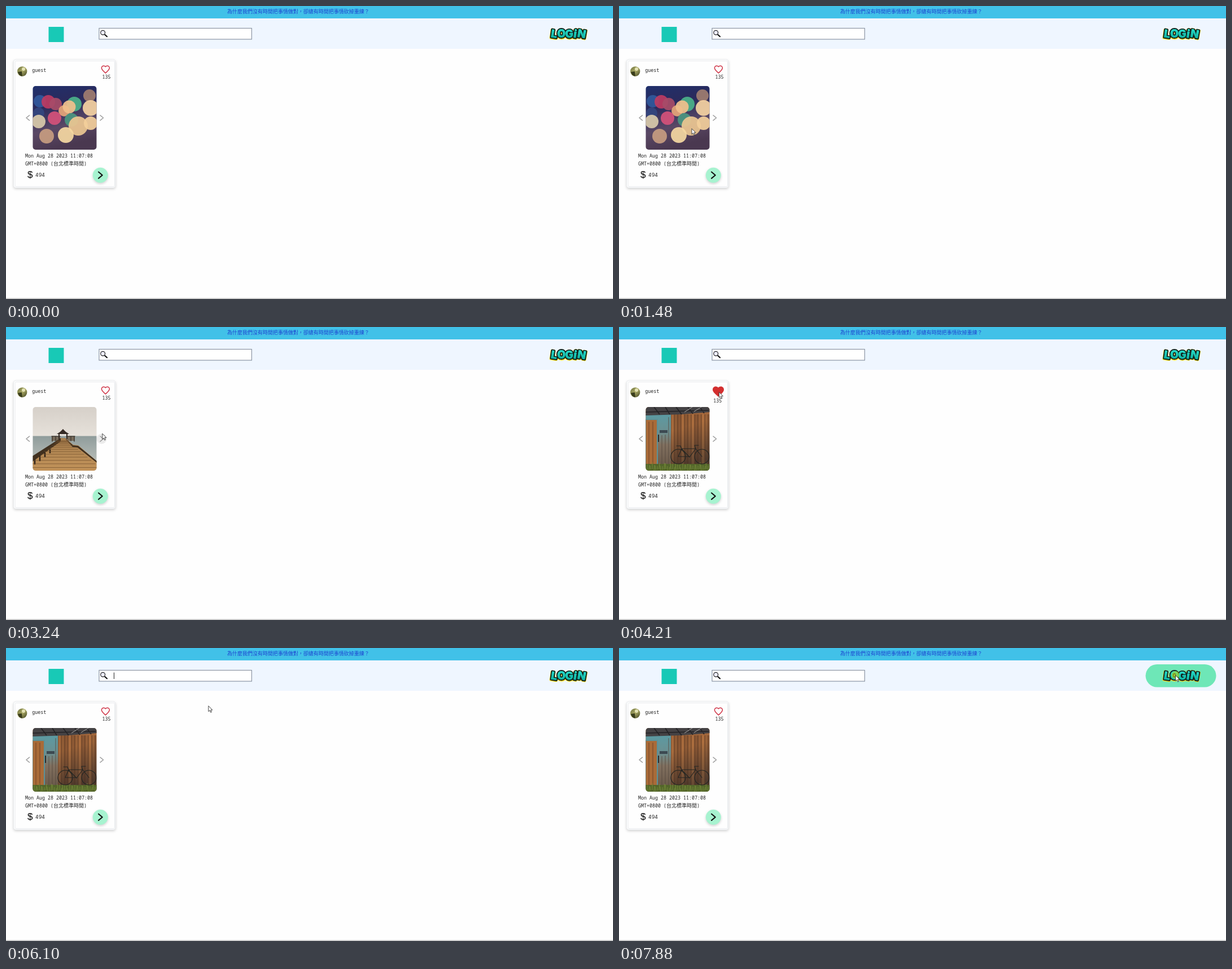
An HTML page for the animation above (8000 ms loop, 1076 by 520 pixels).

```html
<!DOCTYPE html>
<html lang="zh-TW">
<head>
<meta charset="utf-8">
<style>
html, body { margin: 0; height: 100%; overflow: hidden; background: #fefefe; }
svg { display: block; width: 1076px; height: 520px; }
text { font: 8.33px "Noto Sans Mono", monospace; fill: #222; white-space: pre; }
.cjk { font: 9px "Noto Sans CJK TC", "Noto Sans CJK", sans-serif; }
.line { fill: none; stroke-linecap: round; stroke-linejoin: round; }
.card { filter: drop-shadow(0 2px 2px rgba(0, 0, 0, .17)); }
.go { filter: drop-shadow(0 2px 2px rgba(0, 0, 0, .18)); }
.word text { font: 900 19.5px Inter, "DejaVu Sans", sans-serif; text-anchor: middle;
  stroke-linejoin: round; paint-order: stroke; }
</style>
</head>
<body>
<svg viewBox="0 0 1076 520">
  <defs>
    <linearGradient id="night" x2=".25" y2="1">
      <stop stop-color="#20306c"/><stop offset=".35" stop-color="#2a2a5c"/>
      <stop offset=".7" stop-color="#5a4865"/><stop offset="1" stop-color="#4a3850"/>
    </linearGradient>
    <linearGradient id="sky" x2="0" y2="1"><stop stop-color="#d6d0c9"/><stop offset="1" stop-color="#e6e1da"/></linearGradient>
    <linearGradient id="sea" x2="0" y2="1"><stop stop-color="#8f9c9b"/><stop offset="1" stop-color="#c6c9c3"/></linearGradient>
    <linearGradient id="deck" x2="0" y2="1"><stop stop-color="#a9804f"/><stop offset="1" stop-color="#c2935a"/></linearGradient>
    <linearGradient id="wall" x2=".3" y2="1"><stop stop-color="#9c5f35"/><stop offset=".45" stop-color="#a3683c"/><stop offset="1" stop-color="#523d30"/></linearGradient>
    <linearGradient id="side" x2="0" y2="1"><stop stop-color="#5b9aa2"/><stop offset=".35" stop-color="#6c8f90"/><stop offset=".6" stop-color="#81705f"/><stop offset="1" stop-color="#6b5a4b"/></linearGradient>
    <linearGradient id="teal" x2="0" y2="1"><stop stop-color="#2ee6d4"/><stop offset="1" stop-color="#08a996"/></linearGradient>
    <linearGradient id="face" x2="1" y2="1"><stop stop-color="#6f7440"/><stop offset=".5" stop-color="#a9a763"/><stop offset="1" stop-color="#3c4020"/></linearGradient>
    <clipPath id="frame"><rect x="47.5" y="142" width="113" height="113" rx="5"/></clipPath>
    <path id="heart" d="M12 21.35l-1.45-1.32C5.4 15.36 2 12.28 2 8.5 2 5.42 4.42 3 7.5 3c1.74 0 3.41.81 4.5 2.09C13.09 3.81 14.76 3 16.5 3 19.58 3 22 5.42 22 8.5c0 3.78-3.4 6.86-8.55 11.54z"/>
  </defs>

  <!-- header -->
  <rect width="1076" height="22" fill="#41c1e8"/>
  <text class="cjk" x="392" y="12.5" style="fill:#1d42d0">為什麼我們沒有時間把事情做對，卻總有時間把事情砍掉重練？</text>
  <rect y="22" width="1076" height="54" fill="#eff6ff"/>
  <rect x="75.5" y="37" width="27" height="27" fill="#18c9b6"/>
  <rect x="165" y="39.5" width="270.5" height="19.5" fill="#fff" stroke="#8b95a3" stroke-width="1.2"/>
  <circle cx="171.7" cy="47.3" r="3.9" fill="#eef" stroke="#222" stroke-width="1.2"/>
  <path class="line" d="M175.4 51L179 54.3" stroke="#111" stroke-width="2.2"/>
  <path id="caret" d="M191.5 43.5V55" stroke="#222"/>
  <rect id="pill" x="933.5" y="29" width="125" height="40.5" rx="20.2" fill="#6ee7b7"/>
  <g id="login" class="word"></g>
  <rect y="518.5" width="1076" height="1.5" fill="#c4c4c4"/>

  <!-- card -->
  <rect class="card" x="13.5" y="95" width="180.5" height="227.5" rx="4" fill="#fff" stroke="#e8eaed"/>
  <rect x="16" y="97.5" width="176.5" height="223" rx="2" fill="#fefefe" stroke="#e8eaed"/>
  <circle cx="28.7" cy="116" r="8.7" fill="url(#face)"/>
  <circle cx="31" cy="112" r="3" fill="#e3e2b4"/>
  <path d="M21 117l7-1 1 8.7a8.7 8.7 0 0 1-8-7.7" fill="#393d1c"/>
  <text x="46.2" y="117.2">guest</text>
  <g id="empty">
    <use href="#heart" transform="translate(168 104.1) scale(.7)" fill="none" stroke="#cf3346" stroke-width="2.1"/>
    <text x="170.5" y="129.3">135</text>
  </g>
  <g id="full">
    <use href="#heart" x="164" y="102.5" fill="#d32f2f"/>
    <text x="167.3" y="133.5">135</text>
  </g>
  <circle id="halo" cx="169.5" cy="198.5" r="9" fill="#ebebeb"/>
  <path class="line" d="M41.5 194l-5.5 4.5 5.5 4.5M167 194l5.5 4.5-5.5 4.5" stroke="#9a9a9a" stroke-width="1.6"/>

  <g clip-path="url(#frame)">
    <g id="lights"><rect x="47" y="142" width="114" height="114" fill="url(#night)"/></g>
    <g id="pier">
      <rect x="47" y="142" width="114" height="52" fill="url(#sky)"/>
      <rect x="47" y="193.5" width="114" height="62" fill="url(#sea)"/>
      <path d="M81 195h15v7H81zM107 195h15v7h-15z" fill="#776b5a"/>
      <path class="line" d="M81 194h15M107 194h15M82 195v8M88 195v7M115 195v7M121 195v8" stroke="#3d342b" stroke-width="1.3"/>
      <path d="M90 190l6-4 5-5 5 5 6 4zM93 190h2v9h-2zM107 190h2v9h-2z" fill="#352b25"/>
      <path d="M97 197h8l14 12 9 1 33 28v18H47v-17z" fill="url(#deck)"/>
      <path d="M97 197L47 229v10l50-36zM104 197l15 13 9 1 33 27v3l-34-27-9-1z" fill="#40301f"/>
      <path d="M51 235v9M60 229v9M69 223v8M78 217v7" stroke="#2c2118" stroke-width="2.5"/>
      <g id="planks" stroke="#72502c" stroke-width=".7"></g>
    </g>
    <g id="shed">
      <rect x="47" y="142" width="114" height="114" fill="url(#wall)"/>
      <g id="boards"></g>
      <path d="M47 155h45v90H47z" fill="url(#side)"/>
      <path d="M76 192v52M82 191v53M88 160v84" stroke="#54483d" stroke-width=".8"/>
      <path d="M47 164h21v85H47z" fill="#a96b38" stroke="#5b9299" stroke-width="2"/>
      <path d="M53 168v78M60 168v78" stroke="#6e4226"/>
      <path d="M72 183h14v5H72z" fill="#3d4a52"/>
      <path d="M70 191v13" stroke="#2b2b2b" stroke-width="2"/>
      <path d="M47 142h114v9l-50 4-64 2z" fill="#444244"/>
      <path d="M47 151l112-3M62 142l10 13M82 142l8 13M101 142l10 13M122 142l9 12M143 142l8 11" stroke="#232225" stroke-width="1.6"/>
      <path d="M116 151l14-9M133 150l13-8" stroke="#a8a6a4"/>
      <rect x="47" y="243" width="114" height="13" fill="#53652a"/>
      <g id="grass" stroke="#7f963e" stroke-width=".8"></g>
      <path class="line" d="M105 230l6-14h25l11 14M111 216l14 15 11-15M105 230h20M109 211h-7M111 216l-2-5M136 216l-2-6h7" stroke="#222522" stroke-width="1.1"/>
      <g fill="none" stroke="#222522" stroke-width="1.2"><circle cx="105" cy="230" r="13"/><circle cx="147" cy="230" r="13"/></g>
    </g>
  </g>

  <text x="34" y="269.2">Mon Aug 28 2023 11:07:08</text>
  <text x="34" y="282.5">GMT+0800 (<tspan class="cjk">台北標準時間</tspan>)</text>
  <text x="38" y="305" style="font:17px 'Liberation Sans',Arial,sans-serif;fill:#000">$</text>
  <text x="52" y="302.5" style="font-size:9.4px">494</text>
  <circle class="go" cx="167.3" cy="300.2" r="13.5" fill="#a7f3d0"/>
  <path class="line" d="M164 294.5l6.8 5.7-6.8 5.7" stroke="#111" stroke-width="2.1"/>

  <circle id="click" cx="986.5" cy="48" r="7" fill="#b5d922" fill-opacity=".6"/>
  <path id="cursor" d="M0 0v10l2.3-2.1 1.7 3.7 1.6-.7-1.6-3.6h3.1z" fill="#fff" stroke="#333" stroke-width=".9"/>
</svg>
<script>
const LOOP = 8000;
const $ = id => document.getElementById(id);

function add(parent, tag, attrs, label = '') {
  const el = document.createElementNS('http://www.w3.org/2000/svg', tag);
  for (const k in attrs) el.setAttribute(k, attrs[k]);
  el.textContent = label;
  $(parent).append(el);
}

// Bubble lettering: yellow rim, black outline, teal face
const letters = [['L', 971.5, 8], ['O', 984.5, 0], ['G', 998.5, -6], ['i', 1009, 8], ['N', 1020.5, 10]];
for (const [stroke, width, drop] of [['#f4dc1e', 5, 1], ['#10221f', 4, .4], ['none', 0, 0]])
  for (const [c, x, turn] of letters)
    add('login', 'text', {
      x, y: 56 + drop, transform: `rotate(${turn} ${x} 50)`,
      style: `fill:url(#teal);stroke:${stroke};stroke-width:${width}`
    }, c);

const dots = [
  [60, 169, 11, '#31589c'], [58, 190, 10, '#34467f'], [75, 170, 12, '#bd3b62'], [88, 174, 11, '#a84c69'],
  [148, 159, 11, '#a07d70'], [121, 174, 13, '#4bb28a'], [103, 186, 10, '#e8a67a'], [112, 179, 11.5, '#f0c08e'],
  [116, 202, 12, '#4b9680'], [86, 199, 12, '#d5527a'], [150, 181, 14, '#f6d3a2'], [58, 205, 12, '#d9caab'],
  [128, 213, 17, '#ecc792'], [150, 208, 12, '#f3d09c'], [72, 231, 13, '#c79d80'], [106, 229, 14, '#f6d8a2']
];
for (const [cx, cy, r, fill] of dots) add('lights', 'circle', { cx, cy, r, fill, 'fill-opacity': .92 });

for (let i = 0; i < 15; i++) {
  const y = 202 + i * i * .25 + i * .4, k = (y - 197) / 42;
  add('planks', 'path', { d: `M${Math.max(47, 97 - 50 * k)} ${y}H${104 + 50 * k}` });
}
// Weathered boards of varying shade, with dark gaps
for (let i = 0; i < 12; i++) {
  const x = 92 + i * 6, fill = i * 5 % 3 ? '#3a2519' : '#d08a4c';
  add('boards', 'rect', { x, y: 155, width: 6, height: 90, fill, 'fill-opacity': .08 + i * 7 % 5 * .04 });
  add('boards', 'path', { d: `M${x} 155V245`, stroke: '#4a2e1f', 'stroke-width': .8 });
}
for (let i = 0; i < 38; i++)
  add('grass', 'path', { d: `M${47 + i * 3} ${252 + i * 7 % 4}l${i % 3 - 1} -${6 + i * 5 % 7}` });

// Pointer track: time, x, y
const track = [
  [390, 1063, 499], [600, 820, 370], [800, 520, 230], [950, 320, 179], [1060, 215, 250], [1130, 188.5, 302],
  [1330, 140, 235], [1480, 129, 217.7], [1700, 118, 197], [1970, 135, 225], [2300, 168, 205],
  [2510, 170.7, 200.7], [2840, 170.7, 200.7], [2980, 170.8, 195], [3180, 170.8, 195], [3240, 170.8, 189.3],
  [3500, 172, 150], [3800, 176, 121], [3940, 177, 116.5], [4010, 177.3, 115.5], [5000, 177.3, 115.5],
  [5150, 200, 134], [5400, 380, 90], [5550, 457, 42], [5750, 400, 49], [5820, 392, 50], [6100, 358.8, 102.5],
  [6300, 375, 150], [6510, 409.5, 160], [6770, 409.5, 160], [7000, 560, 155], [7250, 850, 95],
  [7400, 960, 55], [7540, 985, 47], [7680, 986.5, 48.5], [LOOP, 986.5, 48.5]
];

// Visible spans: id, from, to
const spans = [
  ['lights', 0, 2580], ['pier', 2580, 3310], ['shed', 3310, LOOP],
  ['halo', 2300, 3310], ['full', 3870, 4400], ['caret', 5820, 6340],
  ['pill', 7370, LOOP], ['click', 7880, LOOP], ['cursor', 390, LOOP]
];

const show = (id, on) => $(id).setAttribute('visibility', on ? 'visible' : 'hidden');

function draw(now) {
  const t = now % LOOP;
  for (const [id, from, to] of spans) show(id, t >= from && t < to);
  show('empty', t < 3870 || t >= 4400);
  const i = track.findIndex(p => p[0] > t);
  if (i > 0) {
    const [t0, x0, y0] = track[i - 1], [t1, x1, y1] = track[i];
    const k = (t - t0) / (t1 - t0);
    $('cursor').setAttribute('transform', `translate(${x0 + (x1 - x0) * k} ${y0 + (y1 - y0) * k})`);
  }
  requestAnimationFrame(draw);
}
draw(performance.now());
</script>
</body>
</html>
```
